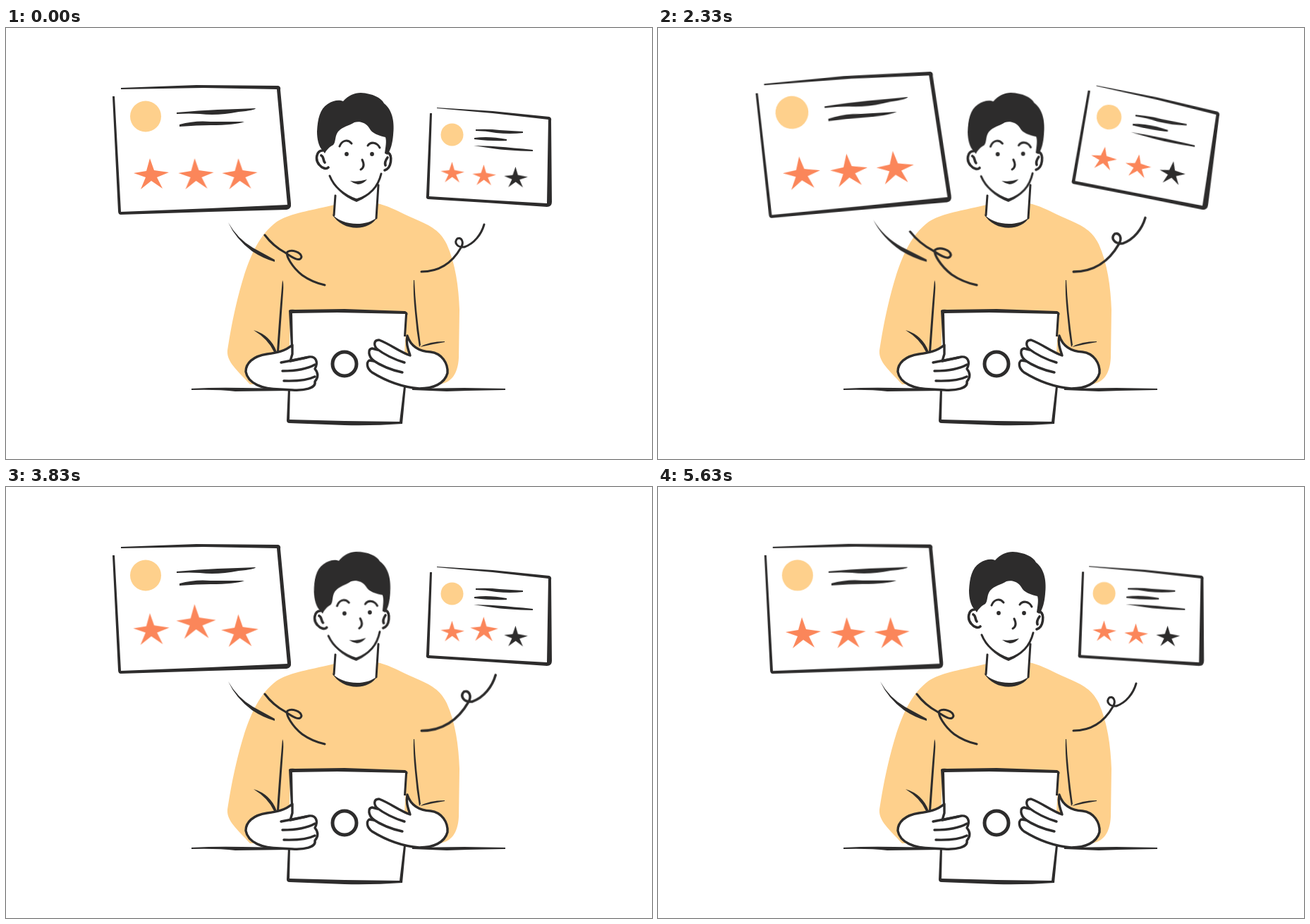
These frames come from a looping animation (916 by 612 pixels, 5710 ms). An HTML page without scripts:

```html
<!DOCTYPE html>
<html lang="en">
<head>
<meta charset="utf-8">
<title>Reviews</title>
<style>
  html, body { margin: 0; width: 100%; height: 100%; overflow: hidden; background: #fff; }
  svg { display: block; width: 916px; height: 612px; }

  :root { --ink: #2d2c2c; --sand: #fed08c; --coral: #fb865a; --loop: 5710ms; --half: 2855ms; }
  .ink { fill: var(--ink); }
  .sand { fill: var(--sand); }
  .coral { fill: var(--coral); }
  .paper { fill: #fff; }
  .line, .hand { fill: none; stroke: var(--ink); stroke-width: 3; stroke-linecap: round; stroke-linejoin: round; }
  .hand { fill: #fff; stroke-width: 3.4; }
  .bold { stroke-width: 3.6; }
  .ring { stroke-width: 5; }

  .head { transform-origin: 494px 256px; animation: head var(--loop) ease-in-out infinite; }
  @keyframes head {
    0%, .5%, 74.4%, 100% { transform: none; }
    9.6%, 34.2% { transform: rotate(4.3deg); }
    43.8%, 67.2% { transform: rotate(-2.3deg); }
  }

  /* both cards swing up once per half loop */
  .card { animation: swing var(--half) cubic-bezier(.37, 0, .63, 1) infinite; }
  .big { transform-origin: 279px 171px; --up: translate(-.5px, -8px) rotate(-3.4deg) scale(1.06); }
  .small { transform-origin: 688px 183px; --up: translate(7.5px, -14px) rotate(7.6deg) scale(1.1); }
  @keyframes swing {
    0%, 64.4%, 98.8%, 100% { transform: translate(0, 0) rotate(0deg) scale(1); }
    81.6% { transform: var(--up); }
  }

  .hop { transform-origin: 0 0; animation: hop var(--half) infinite; animation-delay: var(--d); }
  @keyframes hop {
    0% { transform: translateY(0) scale(1); animation-timing-function: ease-in; }
    6% { transform: translateY(-4px) scale(1.07); animation-timing-function: ease-out; }
    17.9% { transform: translateY(-16px) scale(1.12); animation-timing-function: ease-in; }
    29.7% { transform: translateY(-4px) scale(1.01); animation-timing-function: ease-out; }
    35.7%, 100% { transform: translateY(0) scale(1); }
  }
  .pop { transform-origin: 0 0; animation: pop var(--half) ease-in-out infinite; animation-delay: var(--d); }
  @keyframes pop {
    0%, 31.5%, 100% { transform: translateY(0) scale(1); }
    15.7% { transform: translateY(-7px) scale(1.18); }
  }

  /* threads stretch from their fixed lower ends */
  .t1 { transform-origin: 381px 331px; animation: t1 var(--loop) ease-in-out infinite; }
  .t2 { transform-origin: 453px 365px; animation: t2 var(--loop) ease-in-out infinite; }
  .t3 { transform-origin: 588px 346px; animation: t3 var(--loop) ease-in-out infinite; }
  @keyframes t1 {
    0%, .5%, 58%, 100% { transform: scale(1); }
    10%, 29% { transform: scale(1.234, 1.11); }
    33.8% { transform: scale(1.14, 1.06); }
    47.8% { transform: scale(1.156, 1.075); }
  }
  @keyframes t2 {
    0%, .5%, 58%, 100% { transform: scale(1); }
    10%, 32% { transform: scale(1.163, 1.113); }
    33.8% { transform: scale(1.14, 1.09); }
    47.8% { transform: scale(1.08, 1.045); }
  }
  @keyframes t3 {
    0%, 34.2%, 74.4%, 100% { transform: scale(1); }
    43.8%, 67.2% { transform: scale(1.18); }
  }
</style>
</head>
<body>
<svg viewBox="0 0 916 612">
  <defs>
    <path id="star" d="M-2-23L4-6L25-3L8 4L16 20L0 9L-15 21L-8 4L-25-2L-7-5Z"/>
  </defs>

  <!-- sweater -->
  <path class="sand" d="M466 251C438 258 402 263 384 275C360 293 348 320 338 350C326 388 318 430 314 458C313 474 326 484 346 506H612C632 505 641 490 642 468L643 400C642 368 637 333 625 307C616 288 602 281 584 273C560 263 545 253 526 249Z"/>
  <path class="paper" d="M466 238L464 266C476 284 512 286 525 270L527 222Z"/>

  <!-- head -->
  <g class="head">
    <path class="ink" d="M449 174C443 168 441 157 441 147C442 129 445 115 456 108C465 102 473 102 478 104C485 96 494 92 503 92C520 93 532 99 536 107C549 117 551 136 549 152C548 163 546 172 541 180L537 178C538 170 540 161 538 155C529 153 519 150 515 142C510 134 501 132 494 134C486 139 477 140 471 147C466 153 468 162 464 166C458 169 454 174 452 178Z"/>
    <path class="line bold" d="M449 174C440 174 438 187 444 194C448 199 454 201 457 198M447 181C451 183 449 187 452 191"/>
    <path class="line bold" d="M542 177C548 181 547 199 537 202M541 184C538 188 537 192 538 195"/>
    <path class="line" d="M459 210C465 225 476 236 497 244C513 239 527 228 532 207"/>
    <path class="ink" d="M472 231Q484 241 497 243Q514 237 523 226Q515 240 497 247Q482 241 472 231Z"/>
    <path class="line" d="M473 168C476 160 484 157 490 164M513 167C517 161 526 162 530 170"/>
    <circle class="ink" cx="483" cy="179" r="2.9"/>
    <circle class="ink" cx="519" cy="179" r="2.9"/>
    <path class="line" d="M505 187C508 193 508 198 503 201"/>
    <path class="ink" d="M488 217Q499 219 512 215Q506 222 499 222Q493 221 488 217Z"/>
  </g>
  <path class="line" d="M467 238L465 266M528 223L525 270"/>
  <path class="ink" d="M462 264C474 279 508 284 526 269C516 288 478 291 462 264Z"/>

  <!-- sleeve folds -->
  <path class="ink" d="M392 358Q394 362 393 375L387 460H384Q388 400 392 358Z"/>
  <path class="ink" d="M578 358Q577 375 580 405Q582 430 586 453L588 450Q581 400 579 358Z"/>
  <path class="ink" d="M351 429Q375 436 384 460H380Q372 442 351 429Z"/>
  <path class="ink" d="M622 445Q600 445 587 453Q604 449 622 446Z"/>

  <!-- threads -->
  <path class="ink t1" d="M315 276Q328 299 350 312L381 329V332Q364 327 349 317Q326 300 315 276Z"/>
  <path class="line t2" d="M367 294Q379 310 396 319C406 326 417 333 419 325C418 318 405 314 399 318C396 323 406 340 420 351Q434 361 452 365"/>
  <path class="line t3" d="M678 279C674 293 664 306 650 311C639 312 635 304 640 299C646 297 650 304 645 312C633 333 614 346 589 346"/>

  <!-- table -->
  <path class="ink" d="M263 512Q300 510 335 511L404 512V515L325 516Q300 513 263 514Z"/>
  <path class="ink" d="M576 512L650 511L708 512V514L655 515L625 516L576 514Z"/>

  <!-- laptop -->
  <path class="paper" d="M403 402L568 404L560 561L400 558Z"/>
  <path class="ink" d="M401 401Q403 399 410 400L480 399L566 402Q571 404 569 408L567 438H564L566 406L470 404L406 405L407 450L404 453Z"/>
  <path class="ink" d="M400 512H403L402 556L480 558L558 559L564 509H567L562 562Q520 565 480 564L402 561Q398 561 398 557Z"/>
  <circle class="line ring" cx="480" cy="477" r="17"/>

  <!-- hands -->
  <g class="hand">
    <path d="M406 450C396 459 384 461 370 463C350 466 340 476 340 488C343 505 364 513 388 513L406 514C422 515 440 512 438 502C443 496 443 490 438 484C443 475 440 466 430 467L403 473L406 463Z"/>
    <path fill="none" d="M390 475L426 468M392 487Q422 487 438 478M394 501Q424 502 438 495"/>
    <path d="M569 437C573 449 582 459 602 460C618 462 627 476 626 490C622 505 606 512 586 512C562 510 540 502 519 489C511 483 511 475 515 472L522 473C513 466 513 456 519 455L527 457C521 451 521 443 529 443C545 449 558 460 573 465C570 455 567 449 569 437Z"/>
    <path fill="none" d="M525 455Q542 468 565 475M519 471Q538 484 562 489"/>
  </g>

  <!-- large card -->
  <g class="card big">
    <path class="paper" d="M153 87L387 84L403 253L162 263Z"/>
    <path class="ink" d="M163 85L270 81L386 82Q390 83 389 88L404 249Q405 257 398 258L290 261L163 265Q159 265 159 260L151 97L154 97L163 261L290 256L399 251L384 87L280 85L163 87Z"/>
    <circle class="sand" cx="198" cy="125.500" r="22"/>
    <path class="ink" d="M242 120Q275 117 300 116Q330 115 354 114Q353 117 330 119Q300 125 275 122Q260 121 242 122Z"/>
    <path class="ink" d="M246 137Q268 131 290 133L338 133Q325 138 290 138Q272 138 246 140Z"/>
    <g class="coral">
      <g transform="translate(206 208)"><use class="hop" style="--d:150ms" href="#star"/></g>
      <g transform="translate(269.500 208)"><use class="hop" style="--d:490ms" href="#star"/></g>
      <g transform="translate(331.500 208)"><use class="hop" style="--d:830ms" href="#star"/></g>
    </g>
  </g>

  <!-- small card -->
  <g class="card small">
    <path class="paper" d="M603 114L771 128L771 251L598 241Z"/>
    <path class="ink" d="M611 113L690 118L770 126Q774 127 773 132L774 247Q774 254 767 254L680 248L598 243Q595 242 596 238L601 121H604L600 239L680 244L767 249L769 130L690 121L611 114Z"/>
    <circle class="sand" cx="632.500" cy="151.500" r="16"/>
    <path class="ink" d="M666 144Q685 143 700 145L733 147V149Q715 151 695 149Q680 146 666 146Z"/>
    <path class="ink" d="M664 156Q685 153 710 158V160Q690 161 664 158Z"/>
    <path class="ink" d="M663 167Q690 167 747 173V175Q710 174 690 171Z"/>
    <g class="coral">
      <g transform="translate(633 205.500)"><g class="pop" style="--d:100ms"><use href="#star" transform="rotate(3) scale(.67)"/></g></g>
      <g transform="translate(678 209.500)"><g class="pop" style="--d:545ms"><use href="#star" transform="rotate(3) scale(.67)"/></g></g>
    </g>
    <use class="ink" href="#star" transform="translate(723 212.500) rotate(3) scale(.67)"/>
  </g>
</svg>
</body>
</html>
```
